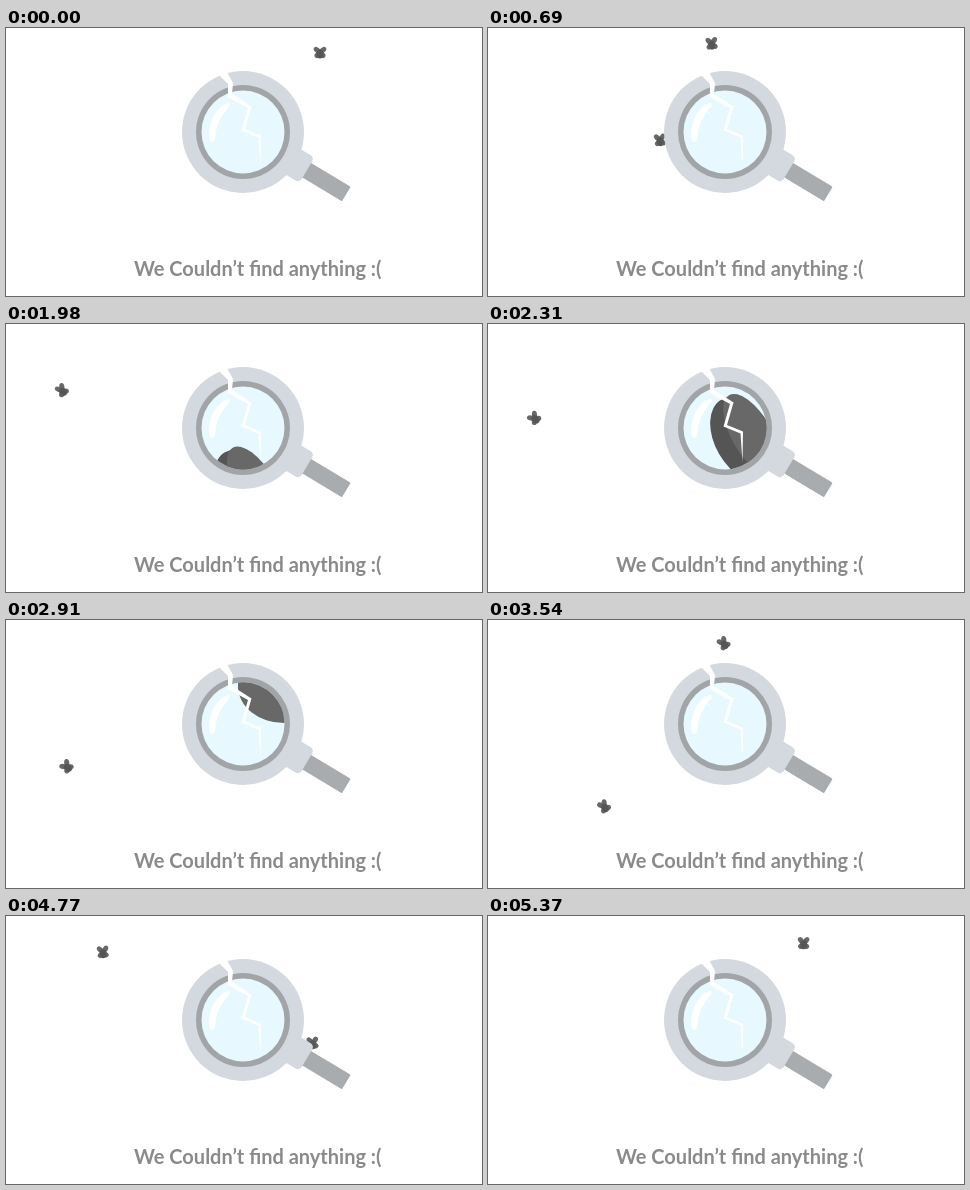
Recreate the animation shown at these times as an HTML page. Size 476 by 268 pixels, loop 5.4 s.

```html
<!DOCTYPE html>
<html lang="en">
<head>
<meta charset="utf-8">
<title>Nothing found</title>
<style>
  html, body { margin: 0; width: 100%; height: 100%; overflow: hidden; background: #fff; }
  svg { display: block; width: 476px; height: 268px; }
  text { font: 700 20px Lato, Roboto, sans-serif; fill: #8a8a8a; }
</style>
</head>
<body>
<svg viewBox="0 0 476 268">
  <defs>
    <clipPath id="glass"><circle cx="237" cy="104" r="41.5"/></clipPath>
  </defs>

  <g class="fly"></g>
  <g class="fly"></g>

  <g transform="translate(237 104) rotate(31)">
    <rect x="70" y="-8.5" width="50.5" height="17" rx="1" fill="#a8acae"/>
    <rect x="50" y="-15" width="24.5" height="29.5" rx="4.5" fill="#d4d9e0"/>
  </g>
  <circle cx="237" cy="104" r="61" fill="#d4d9e0"/>
  <circle cx="237" cy="104" r="47" fill="#a2a5a7"/>
  <circle cx="237" cy="104" r="41.5" fill="#e7f9fe"/>

  <g clip-path="url(#glass)">
    <g id="big">
      <ellipse id="back" rx="29" ry="46" fill="#555"/>
      <ellipse id="front" ry="46" fill="#686868"/>
    </g>
  </g>

  <path d="M222 75C209 79 201 97 204 112Q207 116 209 111C210 96 216 86 223 79Q225 75 222 75Z" fill="#fff"/>
  <path d="M213 47L221 44L227 55L226 66L245.5 78.5L239 101L255 107.5L254.5 138L252.5 109.5L235.5 102.5L242 80L222 69L222 56Z" fill="#fff"/>

  <text x="128" y="247.5">We Couldn’t find anything :(</text>
</svg>
<script>
const LOOP = 5400, STEP = 30;

// Points are evenly spaced in time
const LAP = [[314, 25], [226, 16], [119, 36], [54, 70], [53, 131], [96, 177], [197, 204], [303, 134], [314, 25]];
const VISIT = [[186, -40], [172, 110], [197, 201], [264, 140], [270, 82], [252, 24], [170, 44], [101, 40], [50, -40]];
const ZOOM = [[240, 200], [264, 111], [278, 66], [330, 0]];
const ZOOM_START = 1710, ZOOM_GAP = 600;

const clamp = (v, lo, hi) => Math.min(Math.max(v, lo), hi);

// Catmull-Rom curve; a path that ends where it begins is joined smoothly
function spline(points, pos) {
  const last = points.length - 1;
  const closed = points[0].join() === points[last].join();
  const at = i => points[closed ? (i + last) % last : clamp(i, 0, last)];
  const p = clamp(pos, 0, last), i = Math.min(Math.floor(p), last - 1);
  const u = p - i, v = 1 - u;
  return [0, 1].map(k => {
    const [a, b, c, d] = [-1, 0, 1, 2].map(n => at(i + n)[k]);
    return b * v * v * (1 + 2 * u) + c * u * u * (3 - 2 * u)
      + (c - a) / 2 * u * v * v - (d - b) / 2 * u * u * v;
  });
}

function place(el, [x, y], turn) {
  el.setAttribute("transform", `translate(${x} ${y}) rotate(${turn})`);
}

const lobe = (turn, size) =>
  `<ellipse cy="${-size / 2}" rx="2.6" ry="${size / 2}" transform="rotate(${turn})" fill="#686868"/>`;

const flies = [...document.querySelectorAll(".fly")];
const [big, back, front] = ["big", "back", "front"].map(id => document.getElementById(id));

function draw(now) {
  const t = Math.floor(now % LOOP / STEP) * STEP;
  const turn = -45 * Math.sin(Math.PI * t / LOOP) ** 2;
  const flap = 38 + 8 * Math.cos(t / STEP * Math.PI / 2);
  [LAP, VISIT].forEach((path, i) => {
    flies[i].innerHTML = [-1, 1].map(side => lobe(side * flap, 8) + lobe(side * 130, 6.5)).join("")
      + '<ellipse cy="1" rx="3.4" ry="4.5" fill="#565656"/>';
    place(flies[i], spline(path, t / LOOP * (path.length - 1)), turn);
  });

  const zoom = (t - ZOOM_START) / ZOOM_GAP;
  const open = clamp(zoom - 1, 0, 1);
  place(big, spline(ZOOM, zoom), -30 - 60 * open);
  back.setAttribute("cx", -9 * (1 - open));
  front.setAttribute("rx", 20 + 17 * open);
}

const start = performance.now();
function tick() {
  draw(performance.now() - start);
  requestAnimationFrame(tick);
}
tick();
</script>
</body>
</html>
```
